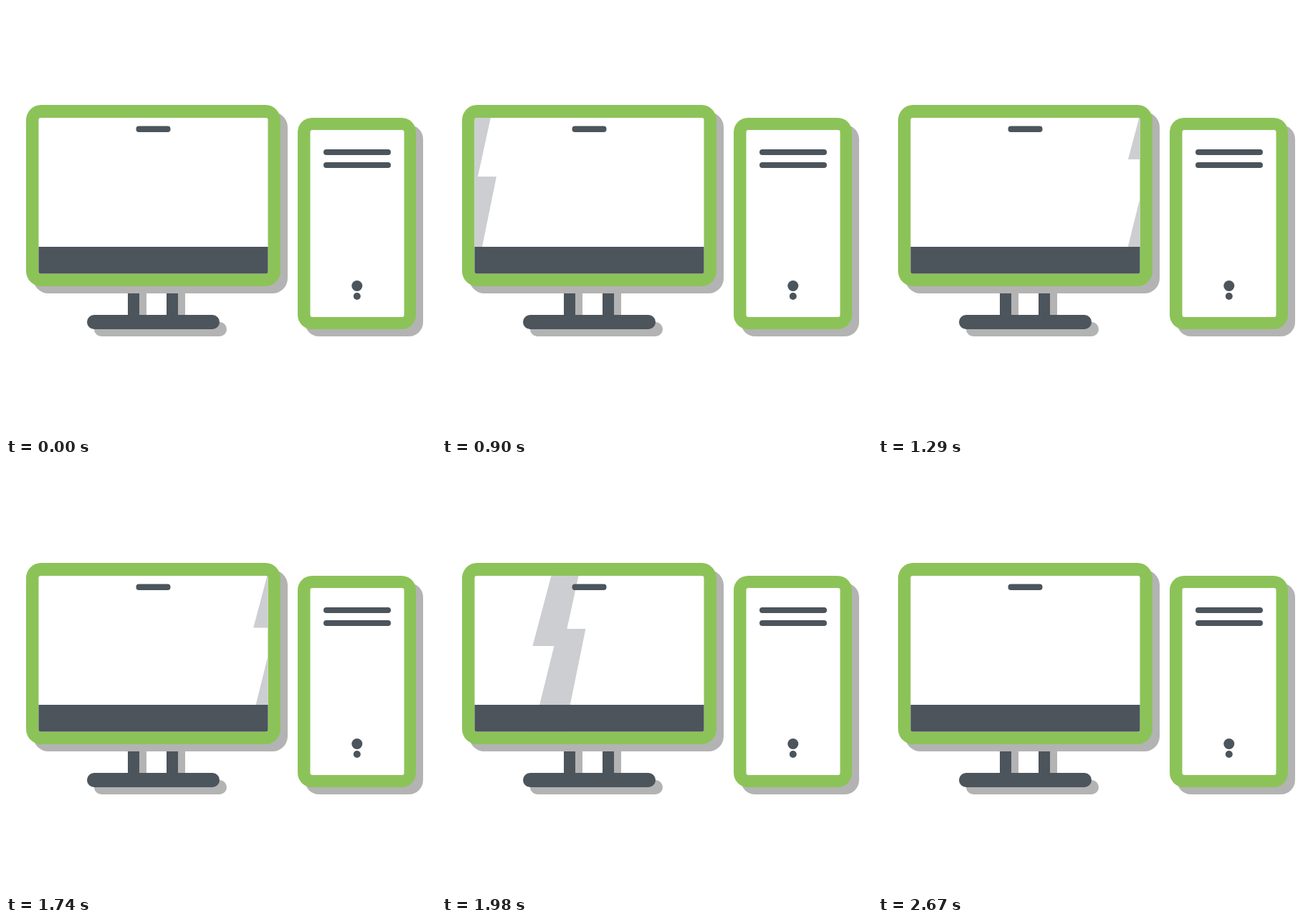
An HTML page that plays this animation: 600x600 px, repeating every 2700 ms.

```html
<!DOCTYPE html>
<html lang="en">
<head>
<meta charset="utf-8">
<title>Desktop computer</title>
<style>
  html, body { margin: 0; height: 100%; overflow: hidden; background: #fff; }
  svg { display: block; width: 100%; height: 100%; }
  .shadow { fill: #b3b3b3; }
  .frame { fill: #8cc358; }
  .panel { fill: #fff; }
  .dark { fill: #4c545c; }
  .glint { fill: #cdced2; }
</style>
</head>
<body>
<svg viewBox="0 0 600 600">
  <defs>
    <clipPath id="screen"><rect x="45.5" y="156" width="320" height="217.5" rx="3"/></clipPath>
    <rect id="monitor" x="28" y="138" width="355" height="253" rx="21"/>
    <rect id="tower" x="407" y="156" width="165" height="295" rx="20"/>
    <rect id="base" x="113" y="431" width="185" height="20" rx="10"/>
    <path id="legs" d="M170 385h16v50h-16zM224 385h16v50h-16z"/>
  </defs>

  <g class="shadow" transform="translate(10 10)">
    <use href="#legs"/>
    <use href="#base"/>
    <use href="#tower"/>
  </g>
  <g class="dark">
    <use href="#legs"/>
    <use href="#base"/>
  </g>

  <use href="#monitor" class="shadow" x="10" y="10"/>
  <use href="#monitor" class="frame"/>
  <g clip-path="url(#screen)">
    <rect class="panel" x="45" y="155" width="321" height="219"/>
    <path id="bolt" class="glint" d="M-1.9-150H32.7L0 0H26L-4.5 150H-49.2L-18 24H-48z" transform="translate(-200 0)"/>
    <rect class="dark" x="45" y="336" width="321" height="38"/>
  </g>
  <rect class="dark" x="181.5" y="167.5" width="48" height="8.5" rx="4"/>

  <use href="#tower" class="frame"/>
  <rect class="panel" x="424.5" y="173" width="131" height="261" rx="3"/>
  <g class="dark">
    <rect x="443" y="200" width="94" height="8" rx="4"/>
    <rect x="443" y="218" width="94" height="8" rx="4"/>
    <circle cx="489.8" cy="390.5" r="7.5"/>
    <circle cx="489.8" cy="405" r="5"/>
  </g>
</svg>
<script>
  const LOOP = 2700, STEP = 30, TURN = 1530;
  const bolt = document.getElementById('bolt');
  const start = performance.now();

  // Steps are counted from the moment the bolt is mid-screen.
  const sweepX = n => 231 + 26.83 * n + 0.139 * n * n;
  const riseY = n => 210 - 3.64 * n + 0.051 * n * n;

  function boltAt(time) {
    if (time < TURN) {
      const n = (time - 1110) / STEP;
      return [sweepX(n), riseY(n)];
    }
    // The way back mirrors the sweep in time, along a lower line.
    return [sweepX((1916 - time) / STEP), 220.5 + 3.19 * (time - 1890) / STEP];
  }

  function draw() {
    const time = (performance.now() - start) % LOOP;
    const [x, y] = boltAt(Math.floor(time / STEP) * STEP);
    bolt.setAttribute('transform', `translate(${x.toFixed(2)} ${y.toFixed(2)})`);
    requestAnimationFrame(draw);
  }
  draw();
</script>
</body>
</html>
```
